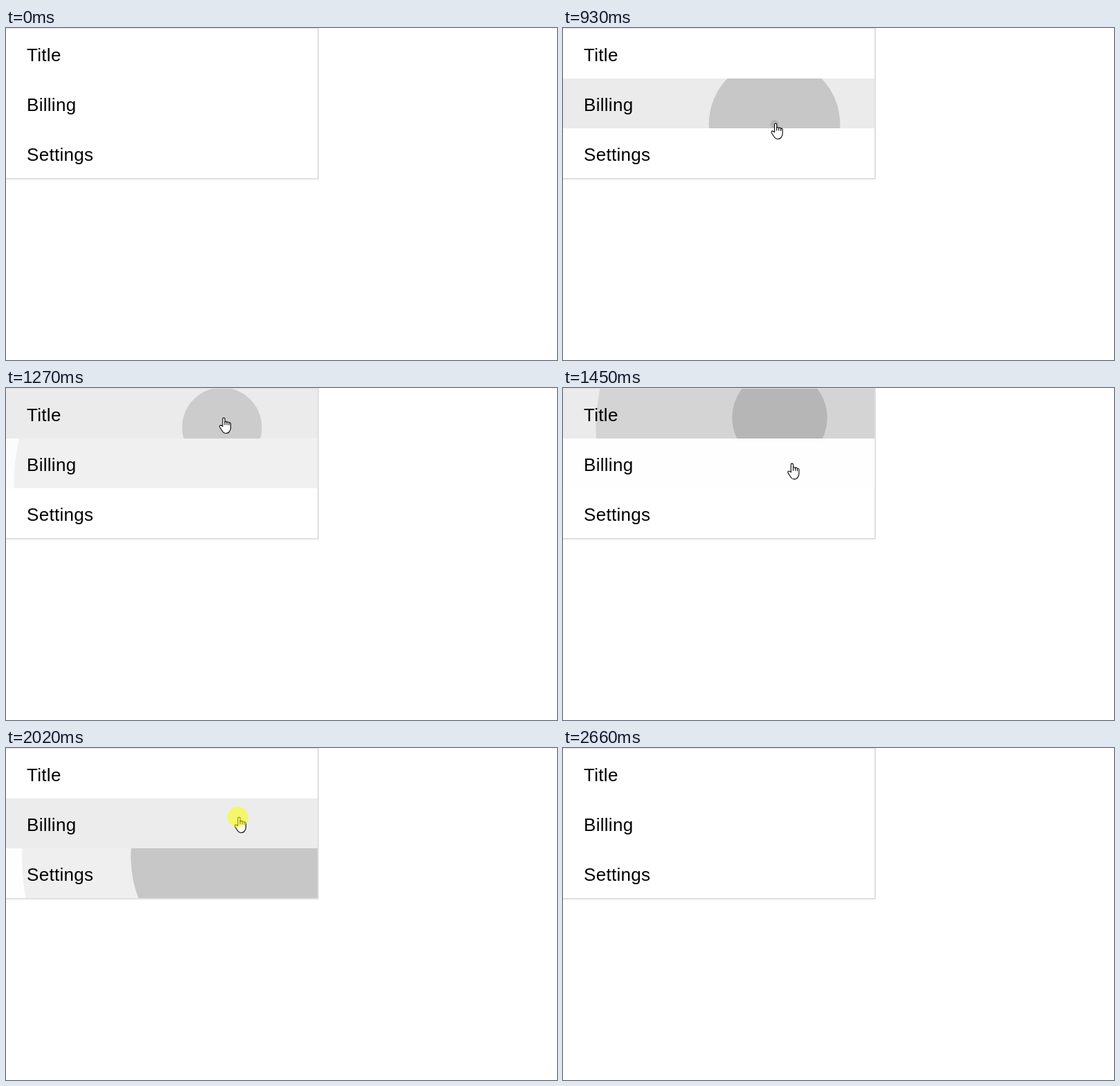
Animation of 796x480 px, one loop 2.87 s. Source, as an HTML page:

```html
<!DOCTYPE html>
<html lang="en">
<head>
<meta charset="utf-8">
<title>Menu ripples</title>
<style>
  html, body { margin: 0; width: 100%; height: 100%; overflow: hidden; background: #fff; }
  svg { display: block; width: 796px; height: 480px; }
  text { font: 26px "Liberation Sans", Arial, sans-serif; letter-spacing: .3px; }
</style>
</head>
<body>
<svg viewBox="0 0 796 480">
  <defs id="defs"></defs>
  <g id="rows"></g>
  <path d="M0 .5H451" stroke="#e0e0e0"/>
  <path d="M451 0V218H0" fill="none" stroke="#e0e0e0" stroke-width="2"/>
  <g id="cursor">
    <g stroke="#000" stroke-width="1.1" stroke-linejoin="round" fill="#fff">
      <g id="hand" transform="translate(1 -.5)">
        <path d="M-1 13V2Q-1 .5 .6 .5T2.2 2V7Q2.4 5.9 3.7 5.9T5.2 7.3Q5.6 6.4 6.7 6.5T8.1 8Q8.6 7.4 9.5 7.6T10.6 9.2V15Q10.6 18 9 20Q7.5 23 4 23H3Q.5 23-1.4 20L-5 14.5Q-6 12.6-5 11.7T-2.6 12Z"/>
        <path fill="none" d="M2.2 6.5V11M5.2 7.3V11M8.1 8V11.5"/>
      </g>
      <path id="arrow" d="M.5 .5V17L4.3 13.4L6.8 19.2L9.4 18.1L6.9 12.4H12.2Z"/>
    </g>
    <circle id="press" r="15" fill="#ff0" fill-opacity=".54"/>
  </g>
</svg>
<script>
const LOOP = 2870, WIDTH = 450, ROW = 72;
const GROW = 550, HOVER = 150, HOLD = 80, LAG = 45;
const $ = id => document.getElementById(id);

// where the pointer rests, and when ripples start there
const stops = [
  { from: 150, to: 150, x: 462, y: 472, clicks: [] },
  { from: 660, to: 930, x: 305.5, y: 139, clicks: [779, 883] },
  { from: 1102, to: 1170, x: 312, y: 57, clicks: [1147] },
  { from: 1270, to: 1372, x: 313, y: 43, clicks: [1318] },
  { from: 1600, to: 1850, x: 341.5, y: 158.5, clicks: [1656, 1836] },
  { from: 2018, to: 2085, x: 335, y: 100, clicks: [2065] },
  { from: 2280, to: 2280, x: 470, y: 450, clicks: [] }
];
const clicks = stops.flatMap(s => s.clicks);

function set(el, attrs) {
  for (const k in attrs) el.setAttribute(k, attrs[k]);
  return el;
}
function add(parent, tag, attrs) {
  const el = document.createElementNS("http://www.w3.org/2000/svg", tag);
  return parent.appendChild(set(el, attrs));
}
const show = (el, on) => set(el, { visibility: on ? "inherit" : "hidden" });

// cubic-bezier(.4, 0, .2, 1)
function ease(x) {
  if (x <= 0) return 0;
  if (x >= 1) return 1;
  let lo = 0, hi = 1;
  for (let i = 0; i < 20; i++) {
    const s = (lo + hi) / 2, r = 1 - s;
    if (1.2 * r * r * s + .6 * r * s * s + s * s * s < x) lo = s; else hi = s;
  }
  return lo * lo * (3 - 2 * lo);
}

// pointer position, or null while it is off stage
function pointer(t) {
  const i = stops.findIndex(s => s.from > t);
  if (i < 1) return null;
  const a = stops[i - 1], b = stops[i];
  const left = 1 - Math.max(0, (t - a.to) / (b.from - a.to));
  const k = 1 - left * left;
  return { x: a.x + (b.x - a.x) * k, y: a.y + (b.y - a.y) * k };
}

const rowAt = p => p && p.x < WIDTH ? Math.floor((p.y - 1) / ROW) : -1;

// times when the pointer is over a row
function findHovers(row) {
  const spans = [];
  let inside = false;
  for (let t = 0; t < LOOP; t += 2) {
    const over = rowAt(pointer(t)) === row;
    if (over && !inside) spans.push({ start: t + LAG });
    if (!over && inside) spans[spans.length - 1].end = t + LAG;
    inside = over;
  }
  return spans;
}

const items = ["Title", "Billing", "Settings"].map((label, i) => {
  const y = ROW * i + 1;
  const box = { x: 0, y, width: WIDTH, height: ROW };
  add(add($("defs"), "clipPath", { id: "clip" + i }), "rect", box);
  const g = add($("rows"), "g", { "clip-path": `url(#clip${i})` });
  const bg = add(g, "rect", box);
  const waves = stops.filter(s => rowAt(s) === i).flatMap(s => s.clicks.map(down => ({
    el: add(g, "circle", { cx: s.x, cy: s.y }),
    down,
    max: Math.hypot(Math.max(s.x, WIDTH - s.x), Math.max(s.y - y, y + ROW - s.y))
  })));
  add(g, "text", { x: 30, y: y + 47 }).textContent = label;
  return { bg, waves, hovers: findHovers(i) };
});

function drawRow({ bg, waves, hovers }, t) {
  const levels = hovers.map(h => ease((t - h.start) / HOVER) * (1 - ease((t - h.end) / HOVER)));
  set(bg, { "fill-opacity": .08 * Math.max(...levels) });
  for (const { el, down, max } of waves) {
    const k = ease((t - down) / GROW);
    const fade = 1 - ease((t - down - HOLD) / GROW);
    set(el, { r: max * k, "fill-opacity": (.1 + .2 * k) * fade });
  }
}

function drawPointer(t) {
  const p = pointer(t);
  show($("cursor"), p);
  if (!p) return;
  set($("cursor"), { transform: `translate(${p.x} ${p.y})` });
  const inList = rowAt(p) >= 0 && rowAt(p) < items.length;
  show($("hand"), inList);
  show($("arrow"), !inList);
  show($("press"), clicks.some(c => t >= c - LAG && t < c - LAG + HOLD));
}

const begin = performance.now();
function tick() {
  const t = (performance.now() - begin) % LOOP;
  items.forEach(item => drawRow(item, t));
  drawPointer(t);
  requestAnimationFrame(tick);
}
tick();
</script>
</body>
</html>
```
